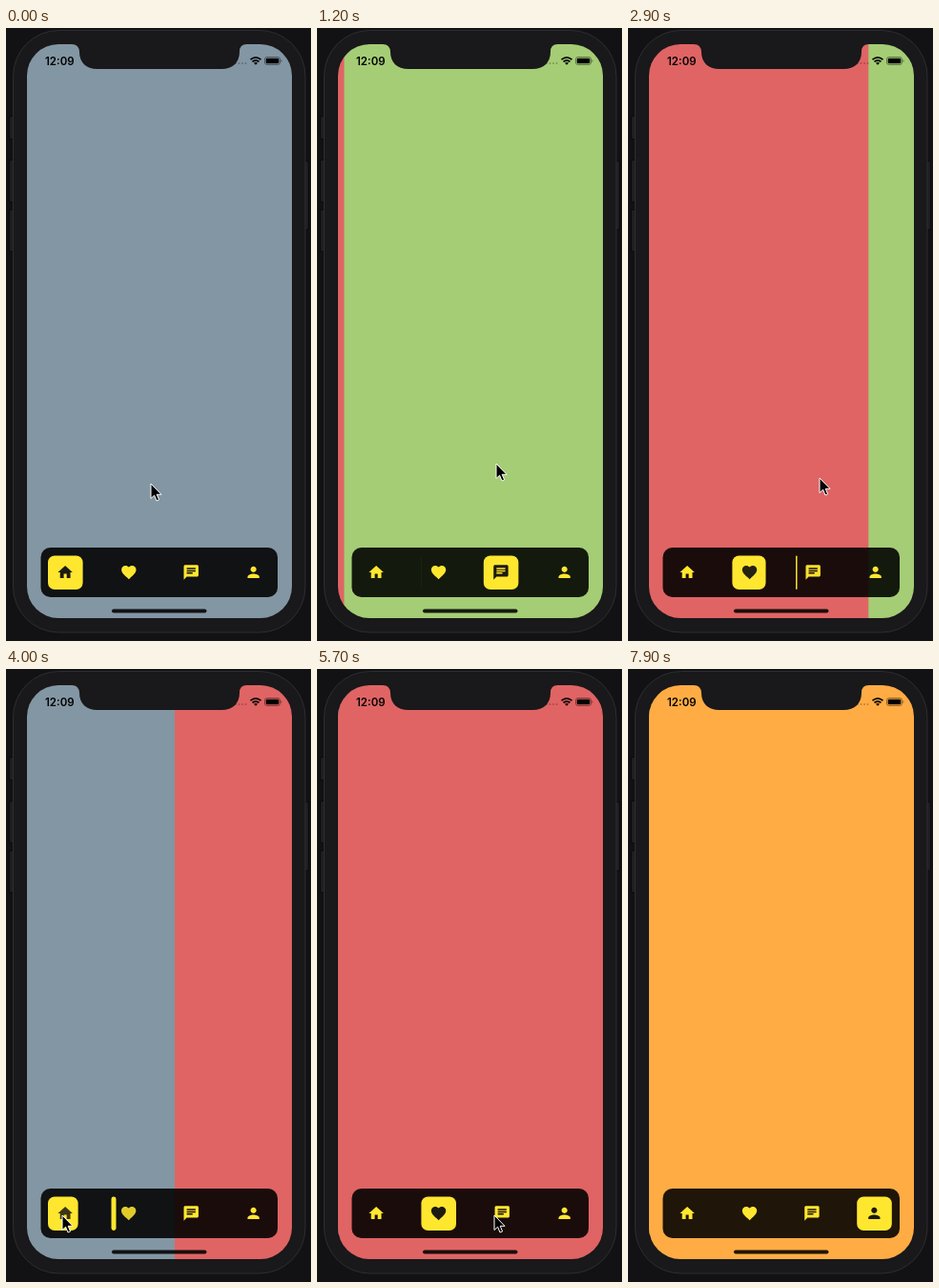
Recreate the animation shown at these times as an HTML page. Size 320x643 px, loop 8 s.

```html
<!DOCTYPE html>
<html lang="en">
<head>
<meta charset="utf-8">
<title>Tab bar</title>
<style>
  html, body { margin: 0; height: 100%; overflow: hidden; background: #121113; }
  svg { display: block; width: 100%; height: 100%; }
  text { font: 600 11.5px Inter, "Liberation Sans", sans-serif; }
</style>
</head>
<body>
<svg viewBox="0 0 320 643">
  <clipPath id="screen"><rect x="22" y="17" width="278" height="602" rx="33"/></clipPath>

  <!-- phone body -->
  <g fill="#1f1e20" stroke="#0b0a0c">
    <rect x="3.5" y="92.5" width="6" height="24" rx="1.5"/>
    <rect x="3.5" y="138.5" width="6" height="44" rx="1.5"/>
    <rect x="3.5" y="190.5" width="6" height="44" rx="1.5"/>
    <rect x="311.5" y="139.5" width="6" height="72" rx="1.5"/>
  </g>
  <rect x="7.5" y="2.5" width="306.5" height="631.5" rx="48" fill="#19181a" stroke="#2e2d2f"/>

  <g clip-path="url(#screen)">
    <g id="pages"></g>
    <path fill="#19181a" d="M69 16v1q7.500 0 8 8c0 11 7 18 19 18h130c12 0 19-7 19-18q0-8 7.500-8v-1z"/>
  </g>

  <!-- status bar -->
  <text x="41" y="38.500">12:09</text>
  <g fill="#000" fill-opacity=".25">
    <circle cx="241" cy="37" r="1"/><circle cx="244.500" cy="37" r="1"/>
    <circle cx="248" cy="37" r="1"/><circle cx="251.500" cy="37" r="1"/>
  </g>
  <g fill="none" stroke="#000" stroke-width="1.700">
    <path d="M256.500 33.200q5.500-4.600 11 0M258.500 35.400q3.500-2.800 7 0"/>
    <path d="M260 36.700q2-1.400 4 0l-2 2z" fill="#000" stroke="none"/>
  </g>
  <rect x="271.500" y="30.500" width="16" height="8" rx="2.300" fill="none" stroke="#000" stroke-opacity=".4"/>
  <rect x="272.700" y="31.700" width="13.600" height="5.600" rx="1.300"/>
  <path d="M288.500 33v3q1-.4 1-1.500t-1-1.500" fill-opacity=".4"/>

  <!-- tab bar -->
  <rect x="36.500" y="545" width="248.500" height="52" rx="10" fill-opacity=".88"/>
  <g id="tabs"></g>
  <rect x="111" y="609.500" width="99.500" height="4" rx="2" fill-opacity=".88"/>

  <path id="cursor" d="M0 0v15.500l3.600-3.300L6 18l2.600-1.100-2.400-5.600H11z" stroke="#fff" stroke-linejoin="round"/>
</svg>
<script>
const LOOP = 8000, STEP = 100, PAGE = 278, BAR_MS = 350, BAR_W = 36.6;
const colors = ['#8396a3', '#e06464', '#a4cd75', '#ffac44'];
const icons = [
  'M10 20v-6h4v6h5v-8h3L12 3 2 12h3v8z',
  'M12 21.350l-1.450-1.320C5.400 15.360 2 12.280 2 8.500 2 5.420 4.420 3 7.500 3c1.740 0 3.410.81 4.500 2.090C13.090 3.810 14.760 3 16.500 3 19.580 3 22 5.420 22 8.500c0 3.780-3.400 6.860-8.550 11.540z',
  'M20 2H4c-1.100 0-2 .9-2 2v18l4-4h14c1.100 0 2-.9 2-2V4c0-1.100-.9-2-2-2zM6 9h12v2H6zm8 5H6v-2h8zm4-6H6V6h12z',
  'M12 12c2.210 0 4-1.790 4-4s-1.790-4-4-4-4 1.790-4 4 1.790 4 4 4zm0 2c-2.670 0-8 1.340-8 4v2h16v-2c0-2.660-5.330-4-8-4z'
];

// Page changes: start, target page, duration, delay of the tab highlight
const swipe = (at, to) => ({ at, to, ms: 500, delay: 95 });
const tap = (at, to) => ({ at, to, ms: 400, delay: 38 });
const moves = [
  swipe(200, 1), swipe(790, 2), swipe(1350, 3), swipe(1950, 2), swipe(2575, 1),
  tap(3792, 0), tap(4750, 1), tap(5800, 2), tap(6600, 3)
];

// Cursor tip: time, x, y
const path = [
  [0, 152, 478], [200, 190, 471], [450, 100, 474], [790, 225, 463], [1050, 170, 458],
  [1200, 188, 457], [1350, 215, 465], [1600, 105, 474], [1800, 100, 474], [1950, 100, 474],
  [2250, 205, 470], [2575, 110, 472], [2850, 200, 472], [2900, 201, 472], [3150, 180, 490],
  [3700, 59, 573], [4150, 59, 573], [4650, 124, 573], [5000, 124, 573], [5550, 186, 573],
  [6000, 186, 573], [6500, 256, 573], [7200, 256, 573], [7800, 308, 490]
];

const clamp = x => Math.min(1, Math.max(0, x));
const mix = (a, b, p) => a + (b - a) * p;
const inOut = x => x < .5 ? 4 * x ** 3 : 1 - 4 * (1 - x) ** 3;
const out = x => 1 - (1 - x) ** 3;
const $ = id => document.getElementById(id);

function add(parent, tag, attrs) {
  const el = document.createElementNS('http://www.w3.org/2000/svg', tag);
  set(el, attrs);
  return parent.appendChild(el);
}
function set(el, attrs) {
  for (const k in attrs) el.setAttribute(k, attrs[k]);
}

colors.forEach((fill, i) =>
  add($('pages'), 'rect', { x: 22 + i * PAGE, y: 17, width: PAGE + 1, height: 602, fill }));
const tabs = icons.map(d => {
  const g = add($('tabs'), 'g', {});
  return {
    g,
    bar: add(g, 'rect', { y: 553.5, height: 35.5, fill: '#ffe72f' }),
    icon: add(g, 'path', { d, 'fill-rule': 'evenodd', transform: 'translate(8.9 561.7) scale(.77)' })
  };
});

function draw(t) {
  let scroll = 0, active = [1, 0, 0, 0];
  for (const m of moves) {
    scroll = mix(scroll, m.to, inOut(clamp((t - m.at) / m.ms)));
    const p = out(clamp((t - m.at - m.delay) / BAR_MS));
    active = active.map((a, i) => mix(a, i === m.to ? 1 : 0, p));
  }
  set($('pages'), { transform: `translate(${-scroll * PAGE})` });

  let left = 44;
  tabs.forEach(({ g, bar, icon }, i) => {
    const a = active[i], width = a * BAR_W;
    set(g, { transform: `translate(${left})` });
    set(bar, { width, rx: Math.min(7, width / 2), ry: Math.min(7, width / 2) });
    set(icon, { fill: `rgb(${mix(255, 28, a)},${mix(231, 26, a)},${mix(47, 16, a)})` });
    left += 65.4 + 1.3 * a;
  });

  const n = path.findIndex(k => k[0] > t);
  set($('cursor'), { visibility: n < 0 ? 'hidden' : 'visible' });
  if (n > 0) {
    const [a, b] = [path[n - 1], path[n]];
    const p = clamp((t - a[0]) / (b[0] - a[0])), e = p * p * (3 - 2 * p);
    set($('cursor'), { transform: `translate(${mix(a[1], b[1], e)} ${mix(a[2], b[2], e)})` });
  }
}

const begin = performance.now();
function frame() {
  const t = (performance.now() - begin) % LOOP;
  draw(Math.floor(t / STEP) * STEP);
  requestAnimationFrame(frame);
}
frame();
</script>
</body>
</html>
```
